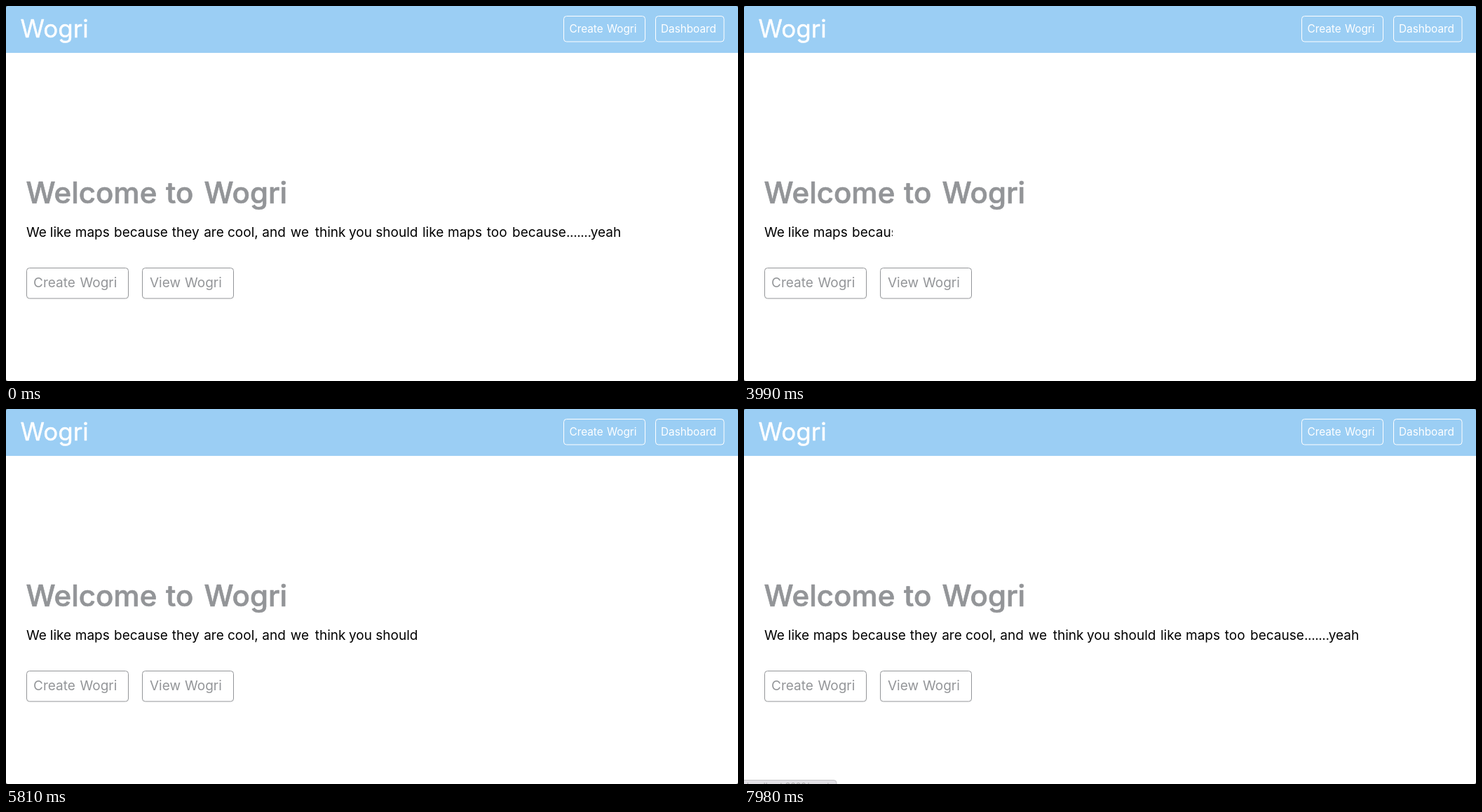
Animation, 1044 px wide and 536 px high, one loop 8000 ms. Source, as an HTML page:

```html
<!DOCTYPE html>
<html lang="en">
<head>
<meta charset="utf-8">
<title>Wogri</title>
<style>
  html, body { margin: 0; width: 100%; height: 100%; overflow: hidden; background: #fff; }
  svg { display: block; width: 100%; height: 100%; }
  text { font-family: Inter, "Open Sans", sans-serif; }
</style>
</head>
<body>
<svg id="stage" viewBox="0 0 1044 536"></svg>
<script>
const LOOP = 8000;
const BLUE = '#9bcef4', GRAY = '#939598';
const stage = document.getElementById('stage');

function add(tag, attrs, parent = stage) {
  const node = document.createElementNS('http://www.w3.org/2000/svg', tag);
  for (const key in attrs) node.setAttribute(key, attrs[key]);
  parent.appendChild(node);
  return node;
}

// words: [string, x, letter spacing?]
function line(y, size, fill, words, extra = {}) {
  const text = add('text', { y, fill, 'font-size': size, ...extra });
  for (const [word, x, spacing = 0] of words) {
    add('tspan', { x, 'letter-spacing': spacing }, text).textContent = word;
  }
  return text;
}

function button(x, y, width, height, stroke) {
  return add('rect', { x, y, width, height, rx: 4, fill: 'none', stroke });
}

const clip = add('clipPath', { id: 'typed' }, add('defs', {}));
const typed = add('rect', { x: 29, y: 300, width: 1015, height: 50 }, clip);

// header
add('rect', { width: 1044, height: 67, fill: BLUE });
line(45, 35, '#fff', [['Wogri', 20.5]], { stroke: '#fff', 'stroke-width': .4, 'stroke-linejoin': 'round' });
button(795.5, 14.5, 116, 36.5, '#fff');
line(38, 15.3, '#fff', [['Create', 803.5], ['Wogri', 857]]);
button(926.5, 14.5, 97.5, 36.5, '#fff');
line(38, 15.3, '#fff', [['Dashboard', 934]]);

// intro
line(282, 42, GRAY, [['Welcome', 28.5], ['to', 228], ['Wogri', 282.5]],
  { 'font-weight': 500, stroke: GRAY, 'stroke-width': .7, 'stroke-linejoin': 'round' });
line(329.5, 19, '#000', [
  ['We', 29], ['like', 62.8], ['maps', 98.8], ['because', 154], ['they', 236.8],
  ['are', 282.2], ['cool,', 316], ['and', 365.3], ['we', 405.8], ['think', 440.8],
  ['you', 489], ['should', 527.3], ['like', 594], ['maps', 630], ['too', 685.8],
  ['because', 722], ['.......', 799, -.4], ['yeah', 833.8]
], { 'clip-path': 'url(#typed)' });

// actions
button(29.5, 374.5, 145, 43.5, GRAY);
const create = line(402, 19, GRAY, [['Create', 39], ['Wogri', 105.5]]);
button(194.5, 374.5, 130, 43.5, GRAY);
line(402, 19, GRAY, [['View', 205], ['Wogri', 255]]);

// window corners and link status
add('path', {
  d: 'M0 0h2l-2 2zM1044 0v2l-2-2zM0 536v-2l2 2zM1044 536h-2l2-2z', fill: '#555', opacity: .7
});
const status = add('g', {});
add('path', { d: 'M-1 530.5H128q4 0 4 4V540H-1z', fill: '#e2e0e5', stroke: '#c3c2c6' }, status);
status.appendChild(line(543, 12, '#aaa', [['localhost:3000/create', 4]]));

const clamp = v => Math.max(0, Math.min(1, v));

function render(t) {
  const steps = Math.floor(1.05 + (t - 3150) / 58.8);
  typed.setAttribute('width', t < 3150 ? 1015 : Math.min(1015, steps * 12.2));
  create.setAttribute('fill', t >= 6860 && t < 7980 ? BLUE : GRAY);
  status.setAttribute('opacity', clamp((t - 6970) / 240));
}

const start = performance.now();
function tick() {
  render((performance.now() - start) % LOOP);
  requestAnimationFrame(tick);
}
tick();
</script>
</body>
</html>
```
